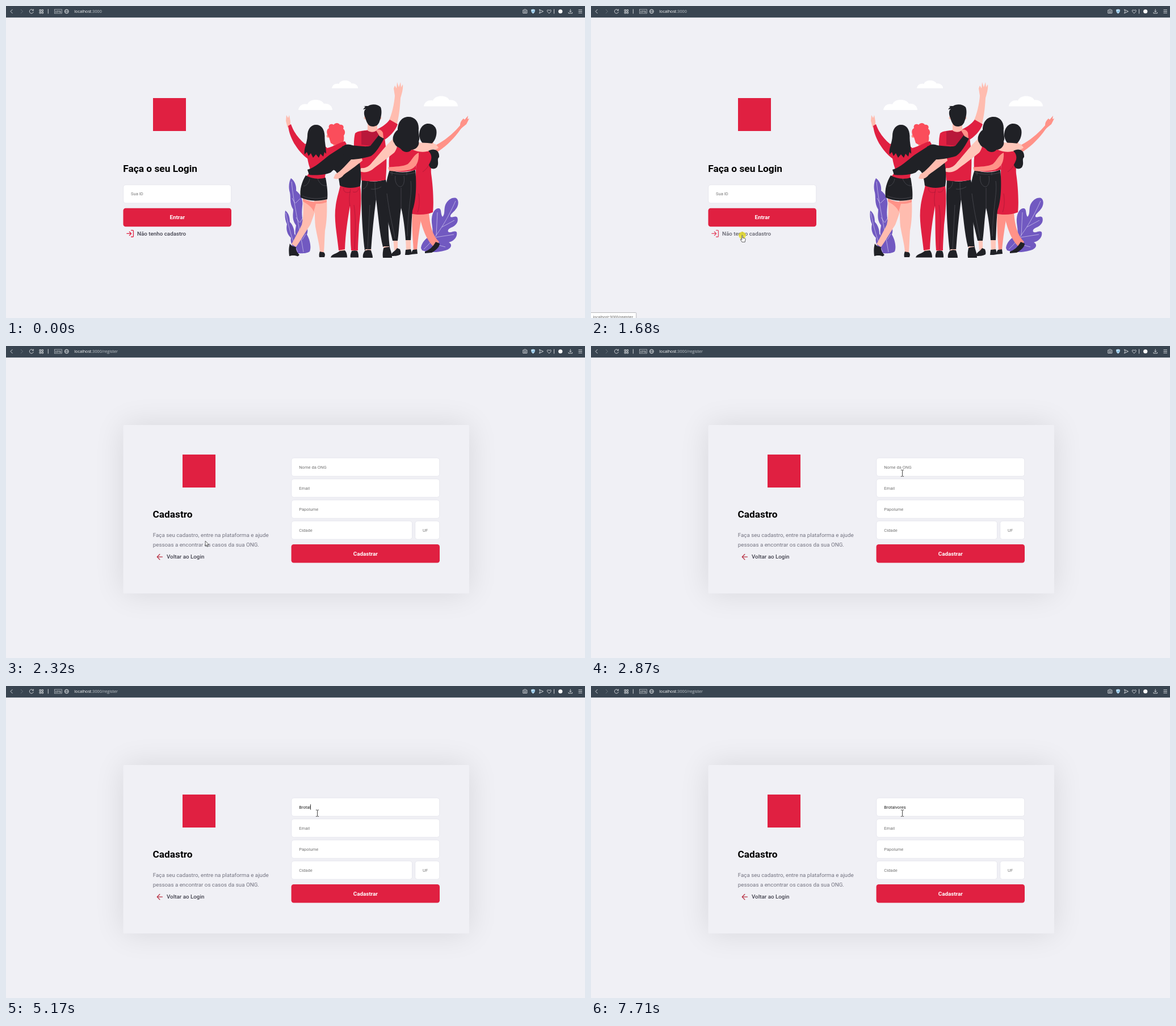
An HTML page that plays this animation: 1020 by 549 pixels, repeating every 8 s.

```html
<!DOCTYPE html>
<html lang="pt-BR">
<head>
<meta charset="utf-8">
<title>Login e cadastro</title>
<style>
html, body { margin: 0; width: 100%; height: 100%; overflow: hidden; background: #f0f0f5; }
svg { display: block; width: 100vw; height: 100vh; }
text { font-family: Roboto, sans-serif; white-space: pre; }
.bar { fill: none; stroke: #dfe3e6; stroke-width: .9; }
.url { font: 500 7.2px "Open Sans", sans-serif; fill: #fff; }
.dim { fill: #c4cacf; font-weight: 400; }
.title { font-size: 17.3px; font-weight: 700; }
.link { font-size: 9.8px; font-weight: 500; fill: #41414d; }
.para { font-size: 9.8px; fill: #737380; }
.label { font-size: 9.8px; font-weight: 700; fill: #fff; text-anchor: middle; }
.hint { font-size: 7.6px; fill: #757575; }
.value { font-size: 7.6px; fill: #222; }
.field { fill: #fff; stroke: #dcdce6; stroke-width: .6; }
.icon { fill: none; stroke: #e02041; stroke-width: 2; stroke-linecap: round; stroke-linejoin: round; }
.ink { fill: #202126; }
.red { fill: #e02041; }
.wine { fill: #b8183a; }
.skin { fill: #ffbcaf; }
.pale { fill: #ffc6b9; }
.blush { fill: #ff9288; }
.leaf { fill: #7159c1; }
.vein { fill: none; stroke: #e6e1f5; stroke-width: .6; }
.seam { fill: none; stroke: #9d1533; stroke-width: .6; }
.stitch { fill: none; stroke: #62636a; stroke-width: .5; }
</style>
</head>
<body>
<svg viewBox="0 0 1020 549" preserveAspectRatio="none">
<defs>
  <filter id="blur" x="-30%" y="-50%" width="160%" height="200%"><feGaussianBlur stdDeviation="27"/></filter>
  <path id="cloud" d="M0 18C1 11 7 6 16 8C20-3 41-2 45 7C53 6 60 11 60 18Z" fill="#fff"/>
</defs>
<rect width="1020" height="549" fill="#f0f0f5"/>

<g id="login">
  <rect class="red" x="259" y="162" width="58" height="58"/>
  <text class="title" x="206.3" y="292.2">Faça o seu Login</text>
  <rect class="field" x="206.7" y="314.7" width="190" height="32.2" rx="4.3"/>
  <text class="hint" x="220" y="332.5">Sua ID</text>
  <rect class="red" x="206.5" y="355.8" width="190.5" height="32.4" rx="4.3"/>
  <text class="label" x="301.7" y="375.4">Entrar</text>
  <g id="signup">
    <path class="icon" transform="translate(211 392.8) scale(.64)" d="M15 3h4a2 2 0 0 1 2 2v14a2 2 0 0 1-2 2h-4M10 17l5-5-5-5M15 12H3"/>
    <text class="link" x="231" y="403.6">Não tenho cadastro</text>
  </g>

  <use href="#cloud" transform="translate(574 131) scale(.77)"/>
  <use href="#cloud" x="515" y="165"/>
  <use href="#cloud" x="736" y="158.5"/>

  <g id="plants">
    <path class="leaf" d="M502 303C509 308 512 317 511 325C518 330 524 340 522 352C521 362 521 370 523 378C531 385 533 395 530 402C536 412 538 425 535 432C530 436 516 436 510 434C507 428 513 420 514 412C507 402 510 394 511 386C503 376 506 366 506 358C499 347 502 337 500 328C497 318 499 308 502 303Z"/>
    <path class="leaf" d="M492 360C498 364 500 372 500 380C506 386 508 394 508 401C515 408 518 424 517 434H512C507 426 500 418 502 408C495 402 493 392 495 384C491 376 491 366 492 360Z"/>
    <path class="vein" d="M503 309C507 350 517 390 524 433M493 364C498 390 505 415 514 433M509 347l-5-9M510 347l8-8M517 381l-6-9M518 381l5-9M522 411l6-10"/>
    <path class="leaf" d="M731 426C732 416 740 408 751 402C753 392 749 384 750 374C751 362 757 355 763 356C768 358 765 366 769 371C774 366 771 358 774 350C778 341 786 336 793 338C799 342 797 353 792 358C788 364 782 366 783 371C787 373 791 368 795 372C798 380 792 387 784 390C779 392 777 396 780 398C786 399 790 394 794 398C796 407 788 414 780 416C787 419 785 427 774 430C760 434 744 434 733 430Z"/>
    <path class="vein" d="M736 428C758 408 778 375 792 343M758 404L760 363M768 389L790 377M757 407L789 402M748 417L774 424"/>
  </g>

  <g id="friend5">
    <path class="blush" d="M716 362H733C730 385 726 405 724 430L718 432C717 410 714 385 716 362Z"/>
    <path class="blush" d="M727 362H745C746 385 752 405 763 415L755 425C743 415 733 395 727 362Z"/>
    <path class="ink" d="M714 437C714 433 716 430 717 429L724 428L725 436ZM738 432C745 430 752 424 757 415L764 418C764 424 757 430 750 434L738 435Z"/>
    <path class="blush" d="M755 246C775 236 790 222 800 210C800 203 804 200 806 198L808 200L814 193L813 199L816 198L811 208C806 212 803 214 800 218C790 232 775 248 758 258Z"/>
    <path class="blush" d="M734 240H752L757 251H730Z"/>
    <path class="red" d="M726 252C735 256 745 254 752 257C750 272 748 285 749 295C752 315 754 345 752 363C740 368 725 368 711 365C718 345 722 320 722 290C722 275 726 262 726 252Z"/>
    <path class="seam" d="M734 292C742 286 746 280 748 272M727 330C729 345 728 355 725 363"/>
    <path class="ink" d="M743.500 207C734 207 727 217 728 229C730 240 737 246 744 245C753 243 758.500 232 758.500 222C758.500 213 752 207 743.500 207Z"/>
  </g>

  <g id="friend3">
    <path class="ink" d="M627 305C640 310 655 310 669 305C672 320 676 340 674 360C673 385 674 410 676 424H664C658 400 656 370 652 340C648 370 645 400 643 430H632C627 390 625 340 627 305Z"/>
    <path class="pale" d="M633 428H643V432H633ZM665 423H675V427H665Z"/>
    <path class="ink" d="M632 431C636 429 640 429 643 430C644 434 646 438 646 443H629C628 438 630 434 632 431ZM665 426C669 424 673 424 676 424C677 430 680 434 680 443H664C663 437 664 431 665 426Z"/>
    <path class="stitch" d="M629 322C634 320 637 316 637 309M650 310C650 322 651 332 652 340M643 322C648 323 655 322 661 318M641 350L637 428"/>
    <path class="red" d="M615 224C620 219 630 220 638 218C645 222 650 222 653 218C660 222 668 230 668 240C672 265 670 290 669 306C655 309 640 309 626 307C624 280 622 268 614 260C612 245 613 232 615 224Z"/>
    <path class="wine" d="M626 220H660L664 236L657 230L643 246L626 244Z"/>
    <path class="skin" d="M674 203C680 190 684 172 685 158L683 145L685 140L688 145L689 134L692 143L695 134L696 143L699 138C700 146 697 155 695 162C694 180 692 197 688 210Z"/>
    <path class="red" d="M654 217C662 213 670 208 676 200L690 208C686 220 675 231 664 237Z"/>
    <path class="skin" d="M637 203H654V217C650 223 642 223 637 219Z"/>
    <circle class="skin" cx="633" cy="197" r="2.5"/><circle class="skin" cx="659" cy="197" r="2.5"/>
    <path class="ink" d="M633 197C630 190 630 184 634 181L629 182L633 177L630 176L638 176C643 172 655 172 660 178C663 185 661 196 658 203C656 210 651 212 646 212C640 212 636 208 633 197Z"/>
  </g>

  <g id="friend4">
    <path class="pale" d="M682 408H690V430H684ZM704 408H713V430H705Z"/>
    <path class="ink" d="M676 288C690 294 707 294 721 288C724 315 722 345 716 360C714 380 714 400 713 412H704C703 395 700 370 696 355C693 375 692 400 690 413H681C676 390 670 370 667 352C666 330 670 305 676 288Z"/>
    <path class="stitch" d="M686 299C684 310 690 319 696 318C702 315 702 306 701 299M676 293C690 297 707 297 721 293M696 320V355M713 308C716 330 709 345 707 405M671 330C676 370 682 390 685 408M680 292v6M706 292v6"/>
    <path class="ink" d="M678 440C678 434 685 432 689 426L694 428C695 431 696 434 695 437C690 440 684 440 678 440ZM704 429L713 428C714 431 715 434 715 437C711 438 707 438 703 438Z"/>
    <path class="red" d="M683 243C695 250 712 250 720 250L728 256C724 268 722 276 722 288C705 293 690 293 675 288C674 275 674 255 683 243Z"/>
    <path class="pale" d="M684 232C692 240 690 250 684 258C672 268 655 280 645 288C636 294 626 293 622 290L626 285C633 286 640 282 645 275C657 262 668 246 684 232Z"/>
    <path class="blush" d="M727 258C728 275 722 284 712 288C700 291 685 291 675 290L673 284C685 282 700 283 708 278C715 272 718 262 727 258Z"/>
    <path class="pale" d="M715 240C730 241 745 240 757 243L762 249C758 254 754 251 750 253C738 259 725 257 715 252Z"/>
    <path class="ink" d="M709 195C697 195 690 205 690 218C682 224 679 235 684 241C687 249 693 248 696 252C701 259 711 258 714 253C722 253 729 246 727 238C730 232 726 226 727 215C727 203 720 195 709 195Z"/>
    <path class="ink" d="M744 255C752 250 764 252 763 266C758 270 764 276 759 284C753 289 746 286 745 279C750 272 752 262 744 255Z"/>
  </g>

  <g id="friend2">
    <path class="pale" d="M587 425H597V434H587ZM608 425H619V434H609Z"/>
    <path class="red" d="M589 314C600 320 613 320 624 316C627 335 625 360 622 385C621 405 620 420 620 430H608C606 405 607 375 606 352C602 375 598 400 597 428L586 430C583 400 577 375 581 350C583 336 587 326 589 314Z"/>
    <path class="seam" d="M606 352C604 342 605 332 607 322M595 320C593 328 602 330 607 327M611 327C616 329 621 326 621 321M613 350C617 375 615 400 614 428"/>
    <path class="ink" d="M572 442.500C573 437 582 436 588 431L597 430C600 433 601 438 601 442.500ZM609 431C613 430 616 430 619 431C621 435 621 439 621 442.500H607C606 438 608 434 609 431Z"/>
    <path class="ink" d="M577 254C590 243 604 241 612 246L622 270C626 290 626 305 624 317C612 321 600 321 588 316C586 300 584 290 576 288Z"/>
    <circle class="blush" cx="567.5" cy="229" r="2.8"/>
    <path class="blush" d="M570 228H595L594 242L578 248Z"/>
    <path d="M569 231C564 225 564 217 569 215C567 209 573 206 577 209C581 204 587 206 588 209C594 208 596 213 594 216C599 220 597 226 595 228C596 233 595 237 594 240C587 247 577 245 572 241Z" fill="#fb4d5b"/>
  </g>

  <g id="friend1">
    <path class="skin" d="M523 338C532 346 543 347 549 343C546 358 540 375 536 385C527 399 518 414 511 424L503 419C508 410 516 395 521 385C524 373 524 358 523 338Z"/>
    <path class="skin" d="M543 342L565 340C566 362 565 380 562 395C561 410 561 422 560 433H553C552 418 548 405 546 393C543 380 545 362 543 342Z"/>
    <path class="blush" d="M523 339C538 346 552 346 565 341V345C555 349 549 348 546 348L542 362C539 353 530 348 523 344Z"/>
    <path class="ink" d="M500 418C504 424 508 423 511 424C510 431 515 436 517 438L514 440.500C508 438 503 439 499 440C498 432 498 426 500 418ZM553 432C558 434 561 431 562 438L561 442H552C551 438 552 434 553 432Z"/>
    <path class="skin" d="M496 214L493 202L494 192L497 197L499 192L501 203V212Z"/>
    <path class="red" d="M497 211L502 208C507 222 515 233 527 243L533 270C515 257 500 235 497 211Z"/>
    <path class="red" d="M527 243C540 236 556 240 566 250C577 247 588 240 597 238L600 243C590 251 580 259 570 264C566 285 562 295 562 303C550 306 538 304 529 300C534 295 537 290 535 284C532 276 530 262 527 243Z"/>
    <path class="ink" d="M528 298C540 305 553 305 563 302C566 318 567 330 566 340C550 344 533 344 519 337C517 322 521 310 528 298Z"/>
    <path class="stitch" d="M522 334C535 340 552 340 565 336M524 317C530 316 534 311 535 304M549 304C553 314 559 317 565 316"/>
  </g>

  <g id="embraces">
    <path class="ink" d="M598 244L620 262C600 272 580 285 572 293C560 298 545 298 534 297L531 288C545 284 557 272 570 262Z"/>
    <path class="skin" d="M612 266L625 260L628 272C615 283 604 290 595 297C590 304 582 306 577 303L580 296C590 291 600 278 612 266Z"/>
    <path class="ink" d="M592 247C610 242 630 250 642 246L657 227L666 233C660 245 652 258 643 264C630 268 610 272 596 269Z"/>
    <path class="blush" d="M652 219C656 215 662 218 664 223L665 233L658 229Z"/>
    <path class="ink" d="M546 209C537 209 531 217 531 229C530 243 524 252 526 261L530 257L533 264L537 259L541 267L546 261L551 267L554 260L559 265L561 257L564 260C564 248 561 240 561.500 229C561 217 556 209 546 209Z"/>
  </g>
</g>

<g id="register">
  <rect x="206.5" y="139" width="609.5" height="296.5" opacity=".1" filter="url(#blur)"/>
  <rect x="206.5" y="139" width="609.5" height="296.5" rx="2" fill="#f0f0f5"/>
  <rect class="red" x="311" y="191" width="58" height="58"/>
  <text class="title" x="258.5" y="302.2">Cadastro</text>
  <text class="para" x="258.7" y="336">Faça seu cadastro, entre na plataforma e ajude</text>
  <text class="para" x="258.7" y="353.4">pessoas a encontrar os casos da sua ONG.</text>
  <path id="back" class="icon" transform="translate(262.9 363.2) scale(.66)" d="M19 12H5M12 19l-7-7 7-7"/>
  <text class="link" x="283" y="374.3">Voltar ao Login</text>
  <g id="fields"></g>
  <text id="typed" class="value" x="516.2" y="215.6"></text>
  <rect class="red" x="502.6" y="349" width="261.4" height="32.5" rx="4.3"/>
  <text class="label" x="633.3" y="368.8">Cadastrar</text>
  <rect id="caret" width=".8" height="9.6" fill="#111"/>
</g>

<g id="browser">
  <rect width="1020" height="20.3" fill="#394551"/>
  <g class="bar">
    <path d="M11.500 6L8 9.500L11.500 13"/>
    <path d="M26 6L29.500 9.500L26 13" opacity=".3"/>
    <path d="M47.600 7.300A3.500 3.500 0 1 0 48.300 10.200M48.300 5.500V8H45.800"/>
    <path d="M59 6.500h2.500V9H59ZM63 6.500h2.500V9H63ZM59 10.500h2.500V13H59ZM63 10.500h2.500V13H63ZM74.300 5.500V13.500M965.500 5.500V13.500"/>
    <rect x="85.5" y="6" width="13" height="7" stroke-width=".6"/>
    <circle cx="106.8" cy="9.5" r="3.5"/>
    <path d="M103.300 9.500H110.300M106.800 6C104.500 8 104.500 11 106.800 13C109.100 11 109.100 8 106.800 6" stroke-width=".6"/>
    <path d="M910.800 7.200H912.500L913.200 6H915.400L916.200 7.200H917.800V12.600H910.800Z"/><circle cx="914.3" cy="9.8" r="1.5"/>
    <path d="M939.500 6.200L946.500 9.500L939.500 12.800L941 9.500Z"/>
    <path d="M956.800 12.800C951 8.500 953.500 5.500 956.800 7.800C960.100 5.500 962.600 8.500 956.800 12.800Z"/>
    <path d="M994.300 5.500V10.500M992.200 8.700L994.300 10.700L996.400 8.700M991 11V12.800H997.600V11M1008.500 6.800H1015M1008.500 9.500H1015M1008.500 12.200H1015"/>
  </g>
  <path d="M928.500 5.500L932 6.500C932 10 931 12 928.500 13.500C926 12 925 10 925 6.500Z" fill="#b9def5"/>
  <path d="M926.800 9.300L928.200 10.700L930.500 8" fill="none" stroke="#2d7fb8" stroke-width=".9"/>
  <circle cx="976.7" cy="9.5" r="3.6" fill="#fff"/>
  <text x="92" y="11.5" font-size="5" fill="#e6e9eb" text-anchor="middle" letter-spacing=".4">VPN</text>
  <text class="url" x="120.3" y="12">localhost<tspan class="dim">:3000</tspan><tspan id="route" class="dim">/register</tspan></text>
</g>

<g id="status">
  <rect x="-2" y="539.5" width="81.7" height="12" rx="1" fill="#fff" stroke="#a9a9ad" stroke-width=".8"/>
  <text x="3.5" y="549.7" style="font:6.65px 'Open Sans',sans-serif" fill="#555">localhost:3000/register</text>
</g>

<g id="pointer">
  <circle id="click" r="6.3" fill="#e6dc1e" opacity=".8"/>
  <path id="arrow" d="M0 0V8.800L2 7L3.400 10.200L4.800 9.600L3.400 6.500H6.200Z" fill="#fff" stroke="#222" stroke-width=".7"/>
  <path id="hand" d="M-.8.800C-.8-.3.800-.3.800.8V4.500L4.500 5.300C5.500 5.600 5.700 6.500 5.500 7.500L4.700 11.800H-.5L-3.200 7.600C-3.500 6.700-2.300 6.200-1.700 7L-.8 8Z" fill="#fff" stroke="#222" stroke-width=".7"/>
  <path id="beam" d="M-2.600-5.600H-.7L0-5L.7-5.600H2.600M0-5V5M-2.600 5.600H-.7L0 5L.7 5.600H2.600" fill="none" stroke="#333" stroke-width=".9"/>
</g>
</svg>
<script>
const LOOP = 8000, PAGE = 1840;
const NAME = "Brotalvores";
const KEYS = [4040, 4120, 4270, 4350, 4570, 5170, 5530, 5760, 5910, 6080, 6230];
const $ = id => document.getElementById(id);
const within = (t, a, b) => t >= a && t < b;
const show = (id, on) => $(id).setAttribute("visibility", on ? "visible" : "hidden");

const fields = [
  [502.9, 197, 260.8, "Nome da ONG"],
  [502.9, 234, 260.8, "Email"],
  [502.9, 271, 260.8, "Papolume"],
  [502.9, 308, 212.7, "Cidade"],
  [720.7, 308, 43, "UF"]
];
$("fields").innerHTML = fields.map(([x, y, w, hint]) =>
  `<rect class="field" x="${x}" y="${y}" width="${w}" height="32.2" rx="4.3"/>
   <text class="hint" x="${x + 13.3}" y="${y + 18.6}">${hint}</text>`).join("");
const nameHint = $("fields").querySelector("text");

// Each move: first step, last step, step count, destination
const moves = [
  [210, 820, 9, 230, 337],
  [980, 1290, 5, 266.5, 409.5],
  [1440, 1520, 2, 266.5, 403.5],
  [2150, 2710, 8, 534, 212.5],
  [2790, 2870, 2, 548.5, 223.8]
];

function pointerAt(t) {
  let x = 806, y = 494;
  for (const [a, b, n, tx, ty] of moves) {
    if (t < a) break;
    const step = Math.min(n, 1 + Math.floor((t - a) / (b - a) * (n - 1) + 1e-6));
    const p = a === 210 ? (step - 1) / (n - 1) : step / n;
    const e = p * p * (3 - 2 * p);
    x += (tx - x) * e;
    y += (ty - y) * e;
  }
  return [x, y];
}

function pointerKind(x, y, login) {
  const over = (l, t, r, b) => x > l && x < r && y > t && y < b;
  if (!login) return fields.some(([l, t, w]) => over(l, t, l + w, t + 32.5)) ? "beam" : "arrow";
  if (over(206, 314, 397, 347)) return "beam";
  return over(206, 355, 397, 388) || over(212, 392, 317, 412) ? "hand" : "arrow";
}

function drawForm(t) {
  const count = KEYS.filter(k => t >= k).length;
  $("typed").textContent = NAME.slice(0, count);
  nameHint.setAttribute("visibility", count ? "hidden" : "inherit");
  const nameCaret = within(t, 2950, 3490) || within(t, 4040, 5050) || within(t, 5170, 6780);
  const mailCaret = within(t, 7160, 7710);
  show("caret", nameCaret || mailCaret);
  $("caret").setAttribute("x", 516.2 + (nameCaret && count ? $("typed").getComputedTextLength() : 0));
  $("caret").setAttribute("y", mailCaret ? 245.2 : 208.2);
  $("back").style.stroke = t < 2150 ? "#e02041" : "#b83244";
}

function draw(t) {
  const login = t < PAGE;
  $("login").style.display = login ? "" : "none";
  $("register").style.display = login ? "none" : "";
  $("route").style.display = login ? "none" : "";

  const [x, y] = pointerAt(t);
  const kind = pointerKind(x, y, login);
  const hover = login && kind === "hand" && y > 390;
  $("signup").setAttribute("opacity", hover ? .8 : 1);
  const fade = [1, .6, .25];
  $("status").setAttribute("opacity", login ? +hover : t < 2150 ? fade[Math.min(2, Math.floor((t - PAGE) / 80))] : 0);

  $("pointer").style.display = t < 210 ? "none" : "";
  $("pointer").setAttribute("transform", `translate(${x} ${y})`);
  for (const id of ["arrow", "hand", "beam"]) show(id, id === kind);
  show("click", within(t, 1600, PAGE) || within(t, 2950, 3030));

  if (!login) drawForm(t);
}

const start = performance.now();
function tick() {
  draw((performance.now() - start) % LOOP);
  requestAnimationFrame(tick);
}
tick();
</script>
</body>
</html>
```
